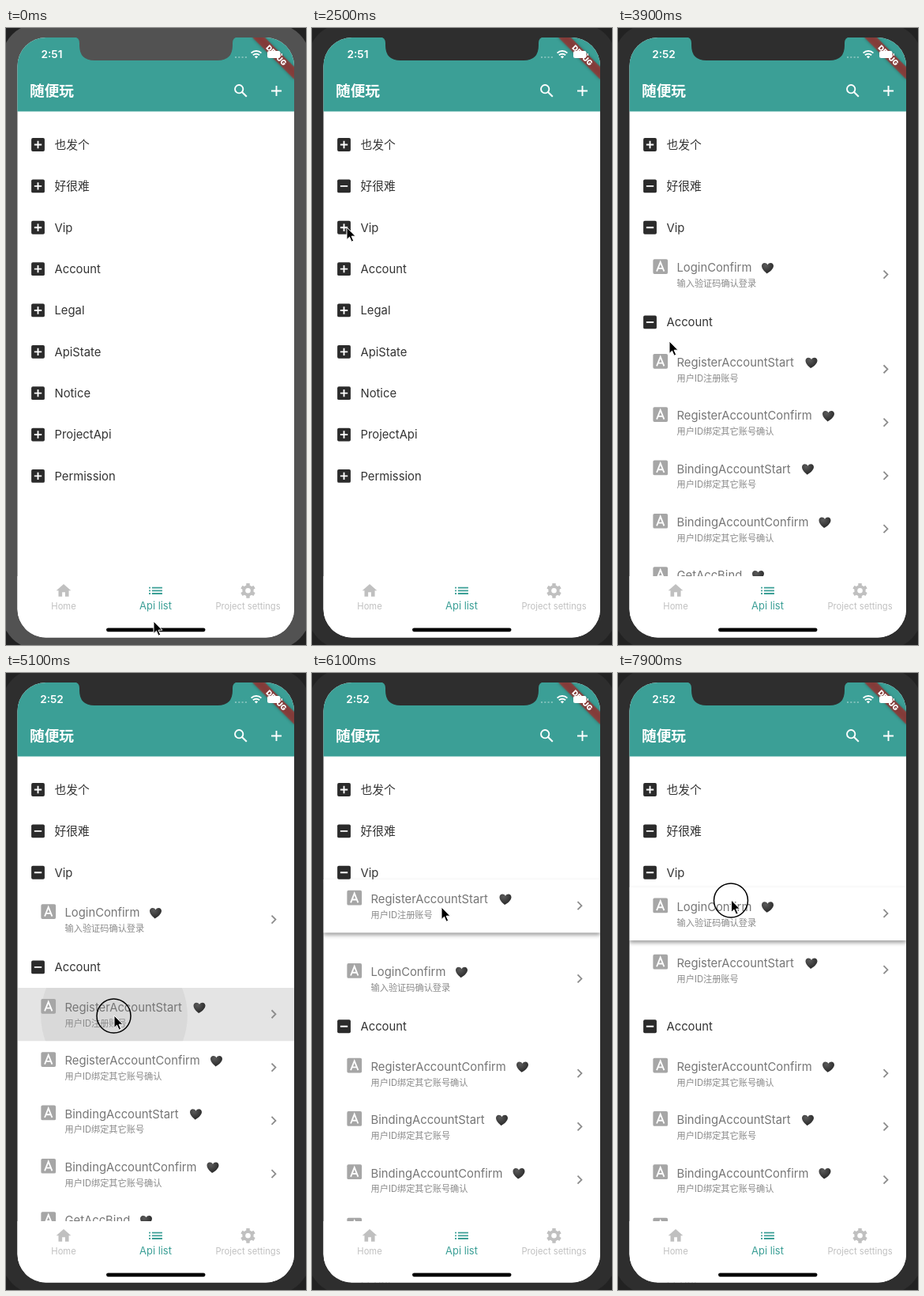
An HTML page for the animation above (8 s loop, 380 by 780 pixels).

```html
<!DOCTYPE html>
<html lang="zh-Hans">
<head>
<meta charset="utf-8">
<style>
html, body { margin: 0; width: 100%; height: 100%; overflow: hidden; background: #222; }
svg { display: block; }
text { font-family: Inter, 'Noto Sans CJK SC', 'Noto Sans CJK', sans-serif; white-space: pre; }
.head text { font-size: 14.8px; fill: #333; }
.name { font-size: 14.8px; fill: #767676; }
.note { font-size: 11.2px; fill: #8a8a8a; }
.lifted { filter: drop-shadow(0 3px 2.5px rgba(0,0,0,.38)); }
.mid { text-anchor: middle; }
</style>
</head>
<body>
<svg width="380" height="780" viewBox="0 0 380 780">
  <defs>
    <clipPath id="screen"><rect x="14.5" y="12" width="350.5" height="758.5" rx="36"/></clipPath>
    <radialGradient id="dark" cx=".35" cy=".25" r=".7">
      <stop offset="0" stop-color="#5a5a5a"/><stop offset="1" stop-color="#2c2c2c"/>
    </radialGradient>
  </defs>
  <rect id="bezel" x="-6" y="-6" width="392" height="792" rx="48"/>
  <g clip-path="url(#screen)">
    <rect width="380" height="780" fill="#fff"/>
    <svg id="ink" x="14.5" width="350.5" height="67.3">
      <rect width="351" height="68" fill="#bcbcbc"/>
      <circle fill="#c8c8c8"/>
    </svg>
    <g id="list"></g>
    <g id="nav"><rect y="693" width="380" height="87" fill="#fff"/></g>
    <rect y="12" width="380" height="93.5" fill="#3b9f96"/>
    <g id="bar" fill="#fff">
      <text x="30" y="86" font-size="18.7" font-weight="600">随便玩</text>
    </g>
    <g transform="translate(365 12) rotate(45)">
      <rect x="-37.4" y="26.2" width="74.8" height="11.2" fill="#b71c1c" fill-opacity=".63"
        style="filter:drop-shadow(0 0 2px rgba(0,0,0,.45))"/>
      <text class="mid" y="35.2" font-size="9.3" font-weight="900" fill="#fff">DEBUG</text>
    </g>
    <g fill="#fff">
      <text id="clock" class="mid" x="58" y="38" font-size="13.6" font-weight="600"></text>
      <path d="M290 37h15" stroke="#fff" stroke-width="2" stroke-dasharray="2 2.3" opacity=".35"/>
      <path d="M310.6 31.6a9.3 9.3 0 0 1 12.8 0M312.9 34.3a6 6 0 0 1 8.2 0" fill="none" stroke="#fff" stroke-width="1.9"/>
      <path d="M314.8 36.3a3.2 3.2 0 0 1 4.4 0l-2.2 2.3z"/>
      <rect x="331" y="29" width="16.5" height="9" rx="2.3"/>
      <rect x="348.6" y="32" width="1.4" height="3.2" rx=".7"/>
    </g>
    <rect x="127" y="758.4" width="125.5" height="4.8" rx="2.4"/>
  </g>
  <path id="notch" d="M86 11Q93 12 93 19V22Q93 41 112 41H268Q287 41 287 22V19Q287 12 294 11Z"/>
  <circle id="touch" r="21.5" fill="none" stroke="#000" stroke-width="1.5"/>
  <path id="cursor" d="M0 0v15.5l3.5-3.3 2.6 6 2.6-1.1-2.6-5.9h4.9z" stroke="#fff" stroke-width="1"/>
</svg>
<script>
const $ = id => document.getElementById(id);
const LOOP = 8000, TICK = 100;
const LIST_TOP = 121.3, HEAD_H = 52.36, ITEM_H = 67.32, GAP = 74.8;

// 24-unit icon centred on x, y
const icon = (x, y, fill, body) =>
  `<g transform="translate(${x - 11.2} ${y - 11.2}) scale(.935)" fill="${fill}">${body}</g>`;
const lines = (d, color, width = 2) =>
  `<path d="${d}" fill="none" stroke="${color}" stroke-width="${width}"/>`;
const add = (el, html) => el.insertAdjacentHTML('beforeend', html);

add($('bar'),
  icon(297.5, 79.5, 'none', '<circle cx="9.5" cy="9.5" r="5.5" stroke="#fff" stroke-width="2"/>' +
    lines('M13.8 13.8l6 6', '#fff', 2.2)) +
  icon(342.5, 79.5, 'none', lines('M5 12h14M12 5v14', '#fff')));

const tooth = a => `<rect x="9.6" y="2" width="4.8" height="20" rx=".6" transform="rotate(${a} 12 12)"/>`;
const tab = (x, label, size, color, body) => icon(x, 711.3, color, body) +
  `<text class="mid" x="${x}" y="735" font-size="${size}" fill="${color}">${label}</text>`;
add($('nav'),
  tab(73, 'Home', 11.2, '#c0c0c0', '<path d="M10 20v-6h4v6h5v-8h3L12 3 2 12h3v8z"/>') +
  tab(189.5, 'Api list', 12.9, '#3b9f96', '<path d="M3 7h2v2H3zm4 0h14v2H7zM3 11h2v2H3zm4 0h14v2H7zM3 15h2v2H3zm4 0h14v2H7z"/>') +
  tab(306.5, 'Project settings', 11.2, '#c0c0c0', [0, 60, 120].map(tooth).join('') +
    '<circle cx="12" cy="12" r="7.6"/><circle cx="12" cy="12" r="3.5" fill="#fff"/>'));

function makeRow(cls, h, html) {
  const el = document.createElementNS('http://www.w3.org/2000/svg', 'g');
  el.setAttribute('class', cls);
  el.innerHTML = html;
  $('list').append(el);
  return { el, h };
}

const head = (label, openAt = Infinity) => Object.assign(makeRow('head', HEAD_H,
  icon(40.5, 26.2, '#2b2b2b', '<rect x="3" y="3" width="18" height="18" rx="2"/>' +
    lines('M7 12h10', '#fff') + `<g class="plus">${lines('M12 7v10', '#fff')}</g>`) +
  `<text x="61.5" y="31.6">${label}</text>`), { openAt });

const item = (name, note, heartX) => makeRow('item', ITEM_H,
  `<rect class="back" x="14.5" width="350.5" height="${ITEM_H}" fill="#fff"/>` +
  icon(53.7, 23.2, '#a6a6a6', '<rect x="2" y="2" width="20" height="20" rx="2"/>' +
    lines('M7 18.5L12 6l5 12.5M8.6 14.5h6.8', '#fff')) +
  `<text class="name" x="74.5" y="30">${name}</text>` +
  `<text class="note" x="74.5" y="48.8">${note}</text>` +
  `<path transform="translate(${heartX} 25)" fill="url(#dark)"
    d="M-1 7C-4 4.500-7.500 1-7.500-2.600C-7.500-7-2-7.800 0-4C2-7.800 7.500-7 7.500-2.600C7.500 1 3 5-1 7Z"/>` +
  lines('M336.500 28.200l5 5-5 5', '#8c8c8c', 1.8));

const top2 = [head('也发个'), head('好很难', 2000)];
const vip = head('Vip', 2800), account = head('Account', 3500);
const rest = ['Legal', 'ApiState', 'Notice', 'ProjectApi', 'Permission'].map(s => head(s));
const login = item('LoginConfirm', '输入验证码确认登录', 189.5);
const start = item('RegisterAccountStart', '用户ID注册账号', 245);
const others = [
  item('RegisterAccountConfirm', '用户ID绑定其它账号确认', 266.5),
  item('BindingAccountStart', '用户ID绑定其它账号', 240.5),
  item('BindingAccountConfirm', '用户ID绑定其它账号确认', 262),
  item('GetAccBind', '用户ID绑定其它账号', 177.5)];
const all = [...top2, vip, account, ...rest, login, start, ...others];

// shift: when each row passed by the dragged one starts to make room
const drags = [
  { row: start, press: 4600, from: 5200, to: 6200, top: 398, x: 137, y: 433,
    shift: new Map([[account, 5400], [login, 5600]]) },
  { row: login, press: 7100, from: 7700, to: LOOP, top: 345.7, x: 138, y: 379,
    shift: new Map([[start, 7730]]) }];
const presses = [[1200, 1300], [1900, 2000], [2700, 2800], [3400, 3500], [4600, 6100], [7100, LOOP]];
const path = [
  [0, 187, 750], [100, 187, 750], [900, 43, 207], [2000, 43, 207], [2400, 44, 252], [2900, 44, 252],
  [3300, 40, 373], [3600, 40, 373], [3900, 65, 396], [4400, 137, 433], [5200, 137, 433],
  [5800, 164, 296], [6200, 164, 296], [7000, 138, 379], [7700, 138, 379], [7900, 143.5, 287], [LOOP, 144, 283]];

const ramp = (t, from, span = 200) => Math.min(1, Math.max(0, (t - from) / span));

function pointer(t) {
  let i = 1;
  while (i < path.length - 1 && path[i][0] < t) i++;
  const [t0, x0, y0] = path[i - 1], [t1, x1, y1] = path[i];
  const p = ramp(t, t0, t1 - t0), e = p * p * (3 - 2 * p);
  return [x0 + (x1 - x0) * e, y0 + (y1 - y0) * e];
}

function rowOrder(t) {
  const dropped = t >= drags[0].to;
  return [...top2, vip,
    ...(t < vip.openAt ? [] : dropped ? [start, login] : [login]),
    account,
    ...(t < account.openAt ? [] : dropped ? others : [start, ...others]),
    ...rest];
}

const place = (el, x, y) => el.setAttribute('transform', `translate(${x} ${y})`);

function layout(t) {
  const drag = drags.find(d => t >= d.from && t < d.to);
  const order = rowOrder(t);
  let y = LIST_TOP, passed = false;
  for (const row of all) {
    const lifted = !!drag && row === drag.row;
    row.el.style.display = order.includes(row) ? '' : 'none';
    row.el.classList.toggle('lifted', lifted);
    const back = row.el.querySelector('.back'), plus = row.el.querySelector('.plus');
    if (back) back.style.display = lifted ? '' : 'none';
    if (plus) plus.style.display = t >= row.openAt ? 'none' : '';
  }
  for (const row of order) {
    if (drag && row === drag.row) {
      place(row.el, 0, drag.top + pointer(t - 55)[1] - drag.y);
      passed = true;
      continue;
    }
    let offset = 0;
    if (drag) {
      const at = drag.shift.get(row);
      offset = GAP * (passed ? 1 : at ? ramp(t, at) : 0);
    } else if (t >= drags[0].to && passed) {
      offset = (GAP - ITEM_H) * (1 - ramp(t, drags[0].to));
    }
    place(row.el, 0, y + offset);
    y += row.h;
    if (!drag && row === start) passed = true;
  }
  if (drag) $('list').append(drag.row.el);
}

function ripple(t) {
  const d = drags.find(d => t > d.press + 100 && t < d.from);
  $('ink').style.display = d ? '' : 'none';
  if (!d) return;
  const [cover, splash] = $('ink').children;
  $('ink').setAttribute('y', d.top);
  cover.setAttribute('opacity', .4 * ramp(t, d.press + 100));
  splash.setAttribute('opacity', .4 * ramp(t, d.press + 100));
  splash.setAttribute('cx', d.x - 14.5);
  splash.setAttribute('cy', d.y - d.top);
  splash.setAttribute('r', 232 * ramp(t, d.press + 100, 1000));
}

function draw(t) {
  const shell = t < 1300 ? '#525252' : '#2e2e2e';
  $('bezel').setAttribute('fill', shell);
  $('notch').setAttribute('fill', shell);
  $('clock').textContent = t < 3000 ? '2:51' : '2:52';
  layout(t);
  ripple(t);
  const [x, y] = pointer(t);
  place($('cursor'), x, y);
  place($('touch'), x - .5, y + .5);
  $('touch').style.display = presses.some(([a, b]) => t >= a && t < b) ? '' : 'none';
}

let begin;
function frame(now) {
  begin ??= now;
  draw(Math.floor((now - begin) % LOOP / TICK) * TICK);
  requestAnimationFrame(frame);
}
requestAnimationFrame(frame);
</script>
</body>
</html>
```
